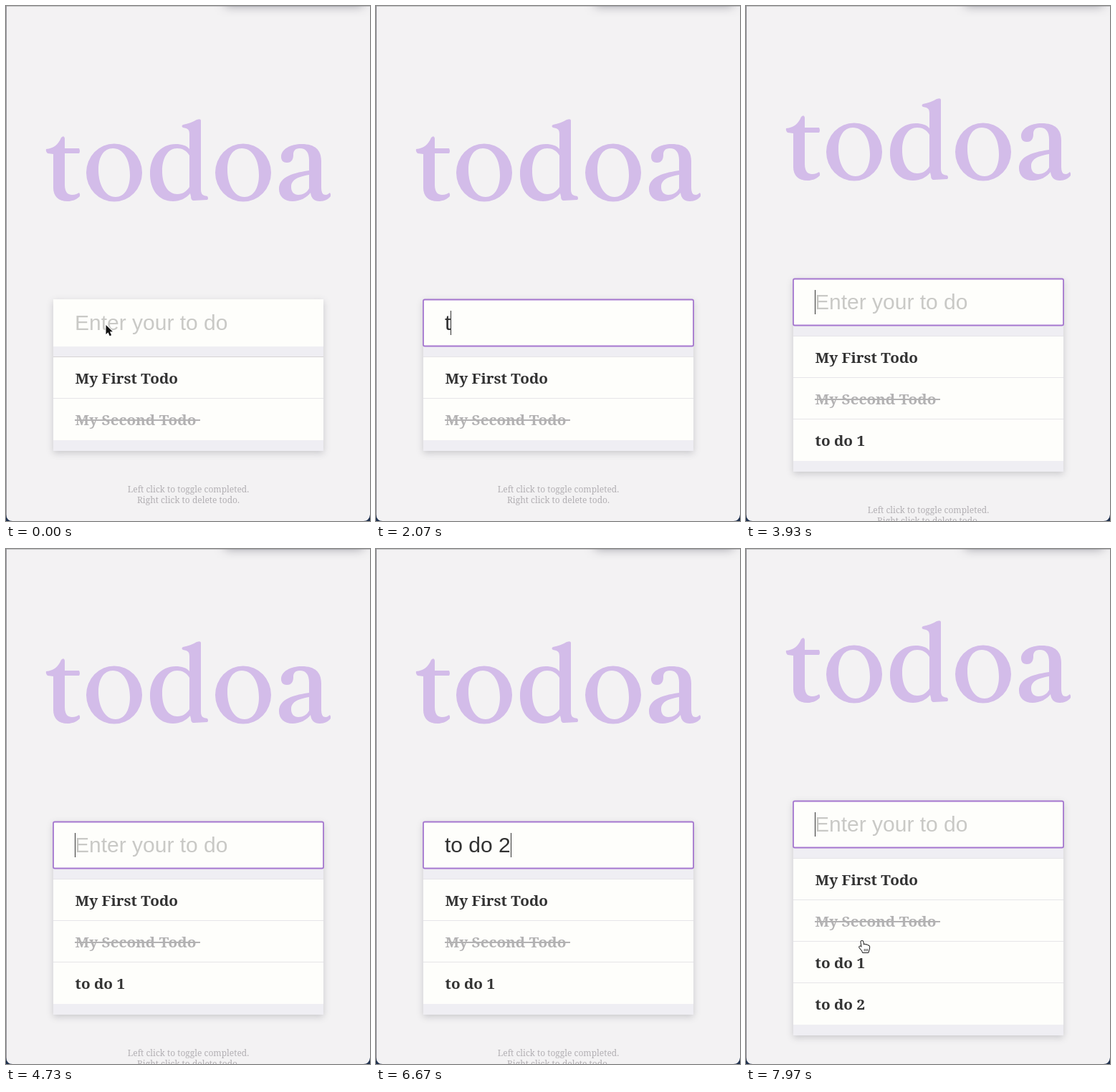
Write an HTML page with a canvas that moves like this. It is 508 px wide and 720 px high and loops after 8000 ms.

```html
<!DOCTYPE html>
<html lang="en">
<head>
<meta charset="utf-8">
<title>Todo list</title>
<style>
  html, body { margin: 0; width: 100%; height: 100%; overflow: hidden; background: #f3f2f3; }
  canvas { display: block; width: 508px; height: 720px; }
</style>
</head>
<body>
<canvas id="stage" width="508" height="720"></canvas>
<script>
const ctx = document.getElementById('stage').getContext('2d');
const W = 508, H = 720, LOOP = 8000;
const LEFT = 66, WIDTH = 377, ROW = 58, STEP = 29;
const COLOR = {
  page: '#f3f2f3', card: '#fefefb', band: '#efeef3', rule: '#e6e5e8', edge: '#d6d3d4',
  title: '#d3bce9', ink: '#323232', hint: '#c9c9c6', done: '#b3b2b3',
  note: '#b3b0b4', focus: '#a577cf', desktop: '#1d2f4d'
};
const SERIF = '"Noto Serif", "Liberation Serif", serif';
const ITEM_FONT = `600 20.7px ${SERIF}`;
const NOTE_FONT = `500 12px ${SERIF}`;
const SANS = '30px "Liberation Sans", Arial, sans-serif';
const MENU = '600 12px Inter, "Noto Sans CJK SC", "Noto Sans CJK JP", sans-serif';
const HISTORY = ['hgb', 'hhh', '好了', 'hh', '啊', 'jj'];

// Each entry: start time, input text, item count, suggestions
const STATES = [
  [700, '', 2, HISTORY],
  [1950, 't', 2], [2130, 'to', 2], [2370, 'to ', 2], [2600, 'to d', 2],
  [2780, 'to do', 2], [2980, 'to do ', 2], [3270, 'to do 1', 2],
  [3600, '', 3],
  [4830, 't', 3, ['to do 1']], [5030, 'to', 3, ['to do 1']],
  [5800, 'to ', 3, ['to do 1']], [6000, 'to d', 3, ['to do 1']],
  [6170, 'to do', 3, ['to do 1']], [6350, 'to do ', 3, ['to do 1']],
  [6550, 'to do 2', 3],
  [6900, '', 4]
].map(([at, text, count, menu = []]) => ({ at, text, count, menu, focus: true }));
const IDLE = { at: 0, text: '', count: 2, menu: [], focus: false };

const ITEMS = [
  { text: 'My First Todo' },
  { text: 'My Second Todo', done: true },
  { text: 'to do 1' },
  { text: 'to do 2' }
];

function ring(x) {
  return `M${x} 233A39 40.5 0 1 1 ${x + 78} 233A39 40.5 0 1 1 ${x} 233Z` +
    `M${x + 17} 229C${x + 17} 210 ${x + 25} 199 ${x + 37} 199` +
    `C${x + 52} 199 ${x + 61} 215 ${x + 61} 236C${x + 61} 255 ${x + 53} 267 ${x + 41} 267` +
    `C${x + 26} 267 ${x + 17} 249 ${x + 17} 229Z`;
}
const TITLE = new Path2D(
  'M56 200C66 199 73 194 77 184Q81 180 82 185V199H102Q104 203 102 206H82V250C82 261 87 264 92 264' +
  'C97 264 100 262 102 261Q104 263 103 266C98 271 92 273 86 273C73 273 66 266 66 254V207L58 206Q55 203 56 200Z' +
  ring(112) +
  'M272 160V256C272 264 275 265 281 266Q283 269 281 271L262 272Q258 272 258 266L257 262' +
  'C251 269 243 273 233 273C213 273 201 257 201 234C201 210 216 193 237 193C245 193 252 195 256 200' +
  'V179C256 173 254 171 247 170Q244 168 247 166Q258 164 266 159Q272 157 272 160Z' +
  'M256 209C252 202 246 199 239 199C226 199 218 212 218 231C218 251 227 263 239 263C247 263 252 259 256 253Z' +
  ring(292) +
  'M425 261C420 268 410 273 400 273C388 273 381 266 381 256C381 241 395 234 423 230V216' +
  'C423 205 419 199 410 199C403 199 401 203 401 208C401 214 399 219 392 219C387 219 384 216 384 211' +
  'C384 200 397 193 413 193C431 193 440 201 440 217V253C440 261 442 264 446 264C449 264 450 262 452 261' +
  'Q454 263 453 266C450 270 445 273 438 273C430 273 426 269 425 261Z' +
  'M423 236C405 239 398 244 398 253C398 260 402 264 408 264C414 264 420 261 423 255Z');

const ARROW = new Path2D('M0 0V13L3 10.2L5.2 15.2L7.6 14.2L5.4 9.3H9.4Z');
const BEAM = new Path2D('M-3 -7Q0 -7 0 -5Q0 -7 3 -7M0 -5V6M-3 7.5Q0 7.5 0 5.5Q0 7.5 3 7.5M-1.5 2.5H1.5');
const HAND = new Path2D('M-4.5 -6.5C-4.5 -8.6 -1.8 -8.6 -1.6 -6.5L-.8 -2.2C0 -3.8 2 -3.4 2.3 -2' +
  'C3.2 -3.2 4.9 -2.6 5 -1.2C6.4 -2 7.4 -.8 7.2 1L6.6 4.5L5.5 8H-2L-3 5.4L-6.6 1.2' +
  'C-7.4 -.4 -5.4 -1.2 -4.2 .2L-3.4 1Z');

function box(x, y, w, h, color) {
  ctx.fillStyle = color;
  ctx.fillRect(x, y, w, h);
}

function write(text, x, y, font, color, align = 'left') {
  ctx.font = font;
  ctx.fillStyle = color;
  ctx.textAlign = align;
  ctx.fillText(text, x, y);
}

function shadow(color, blur, y) {
  ctx.shadowColor = color;
  ctx.shadowBlur = blur;
  ctx.shadowOffsetY = y;
}

function drawWindow() {
  box(0, 0, W, H, COLOR.page);
  ctx.save();
  shadow('rgba(70,70,85,.5)', 14, 0);
  box(306, -12, 192, 12, '#b5b5bb');
  ctx.restore();
}

function drawFrame() {
  box(0, 0, W, 1, 'rgba(120,120,125,.4)');
  box(0, 0, 1, H, '#94949a');
  ctx.fillStyle = COLOR.desktop;
  ctx.fill(new Path2D('M0 711Q1 720 9 720H0ZM508 711Q507 720 499 720H508Z'));
}

function drawItem({ text, done }, i) {
  const y = 491 + i * ROW;
  box(LEFT, y, WIDTH, ROW, COLOR.card);
  box(LEFT, y - 1, WIDTH, 1, COLOR.rule);
  write(text, 96.5, y + 37, ITEM_FONT, done ? COLOR.done : COLOR.ink);
  if (done) box(96, y + 29, 175, 2, COLOR.done);
}

function drawForm(state) {
  const end = 491 + state.count * ROW;
  ctx.save();
  shadow('rgba(90,90,100,.27)', 9, 3);
  box(LEFT, 410, WIDTH, end + 15 - 410, COLOR.band);
  ctx.restore();
  box(LEFT, 410, WIDTH, 66, COLOR.card);
  ITEMS.slice(0, state.count).forEach(drawItem);
  if (!state.focus) box(LEFT, 490, WIDTH, 1, COLOR.edge);
}

function drawInput(state, t) {
  if (state.focus) {
    ctx.beginPath();
    ctx.roundRect(LEFT, 410.5, WIDTH, 65, 2);
    ctx.strokeStyle = COLOR.focus;
    ctx.lineWidth = 1.8;
    ctx.stroke();
  }
  write(state.text || 'Enter your to do', 96, 453, SANS, state.text ? COLOR.ink : COLOR.hint);
  if (state.focus && (t - state.at) % 1000 < 500) {
    const w = state.text ? ctx.measureText(state.text).width : 0;
    box(Math.round(96 + w), 426, 1, 34, COLOR.ink);
  }
}

function drawMenu(rows) {
  if (!rows.length) return;
  ctx.save();
  shadow('rgba(60,60,70,.5)', 4, 1);
  ctx.fillStyle = COLOR.card;
  ctx.beginPath();
  ctx.roundRect(LEFT, 477, WIDTH, 15 + 34 * rows.length, [0, 0, 4, 4]);
  ctx.fill();
  ctx.restore();
  rows.forEach((row, i) => write(row, 77, 506.5 + 34 * i, MENU, COLOR.ink));
}

function drawNotes(shift) {
  write('Left click to toggle completed.', 254.5, 680 + shift, NOTE_FONT, COLOR.note, 'center');
  write('Right click to delete todo.', 254.5, 695 + shift, NOTE_FONT, COLOR.note, 'center');
}

function drawPointer(path, x, y, fill, edge, width) {
  ctx.save();
  ctx.translate(x, y);
  ctx.lineJoin = 'round';
  ctx.strokeStyle = edge;
  ctx.lineWidth = width;
  ctx.stroke(path);
  if (fill) {
    ctx.fillStyle = fill;
    ctx.fill(path);
  }
  ctx.restore();
}

function drawCursor(t) {
  if (t < 500) {
    drawPointer(ARROW, 139.5, 446, '#111', '#fff', 1.8);
  } else if (t < 1950) {
    drawPointer(BEAM, 140, 447, null, '#fff', 2.4);
    drawPointer(BEAM, 140, 447, null, '#222', 1.2);
  } else if (t >= 7500) {
    const p = Math.min((t - 7500) / 400, 1);
    const e = p * p * (3 - 2 * p);
    const x = 140 + 25 * e, y = 447 + 109 * e;
    drawPointer(HAND, x, y, '#fff', '#222', 2);
    for (const dx of [-0.2, 2, 4.2]) box(x + dx, y + 3, 1, 3.5, '#444');
  }
}

function draw(t) {
  const state = STATES.findLast(s => t >= s.at) || IDLE;
  const shift = (state.count - 2) * STEP;
  drawWindow();
  ctx.save();
  ctx.translate(0, -shift);
  ctx.fillStyle = COLOR.title;
  ctx.fill(TITLE, 'evenodd');
  drawForm(state);
  drawNotes(2 * shift);
  drawMenu(state.menu);
  drawInput(state, t);
  ctx.restore();
  drawCursor(t);
  drawFrame();
}

const start = performance.now();
function tick() {
  draw((performance.now() - start) % LOOP);
  requestAnimationFrame(tick);
}
tick();
</script>
</body>
</html>
```
